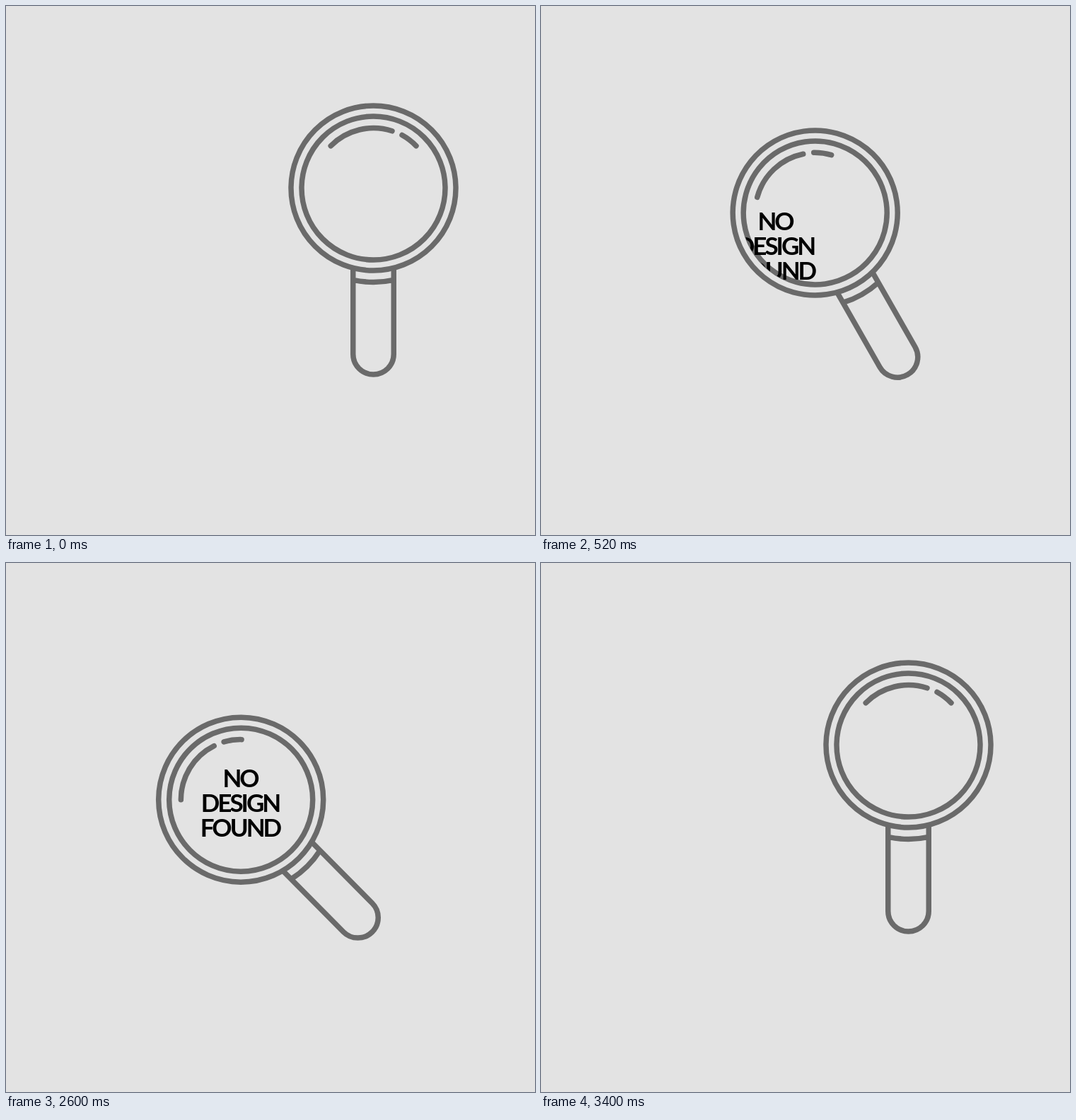
Animation, 748 px wide and 748 px high, one loop 4000 ms. Source, as an HTML page:

```html
<!DOCTYPE html>
<html lang="en">
<head>
<meta charset="utf-8">
<title>No design found</title>
<style>
  html, body { margin: 0; width: 100%; height: 100%; overflow: hidden; background: #e3e3e3; }
  svg { display: block; width: 100%; height: 100%; }
  .glass { fill: none; stroke: #6a6a6a; stroke-width: 7.5; }
  .shine { stroke-linecap: round; }
  text { font: 700 35px Lato, "Open Sans", sans-serif; letter-spacing: -3px; text-anchor: middle; fill: #000; }
</style>
</head>
<body>
<svg viewBox="0 0 748 748">
  <defs>
    <clipPath id="lens"><circle class="swing" cx="519.5" cy="257.5" r="104.5"/></clipPath>
  </defs>
  <g class="glass swing">
    <circle cx="519.5" cy="257.5" r="116.5"/>
    <circle cx="519.5" cy="257.5" r="101.5"/>
    <path class="shine" d="M459.2 197.8A85 85 0 0 1 546 176.8M560 182.5A85 85 0 0 1 580 197.8"/>
    <path d="M490.75 371V492.25a28.75 28.75 0 0 0 57.5 0V371M490.75 387.3A133 133 0 0 0 548.25 387.3"/>
  </g>
  <g clip-path="url(#lens)">
    <text x="331" y="317">NO</text>
    <text x="331" y="352">DESIGN</text>
    <text x="331" y="387">FOUND</text>
  </g>
</svg>
<script>
  const LOOP = 4000, STEP = 40, TILT = -45;
  const PIVOT = "519.5 523.5";
  const swinging = document.querySelectorAll(".swing");

  const clamp = v => Math.min(1, Math.max(0, v));

  // Slow start, steady finish: cubic Bézier (1/3, 0, 5/6, 5/6) solved by bisection.
  function easeAway(u) {
    let low = 0, high = 1;
    for (let i = 0; i < 24; i++) {
      const s = (low + high) / 2, r = 1 - s;
      if (s * r * r + 2.5 * s * s * r + s ** 3 < u) low = s; else high = s;
    }
    return 2.5 * low * low * (1 - low) + low ** 3;
  }

  function angleAt(t) {
    const arriving = 1 - easeAway(1 - clamp(t / 1000));
    const leaving = easeAway(clamp((t - 2560) / 840));
    return TILT * (arriving - leaving);
  }

  const start = performance.now();

  function draw() {
    const elapsed = Math.max(0, performance.now() - start) % LOOP;
    const angle = angleAt(Math.floor(elapsed / STEP) * STEP);
    for (const part of swinging) {
      part.setAttribute("transform", `rotate(${angle.toFixed(3)} ${PIVOT})`);
    }
    requestAnimationFrame(draw);
  }
  draw();
</script>
</body>
</html>
```
